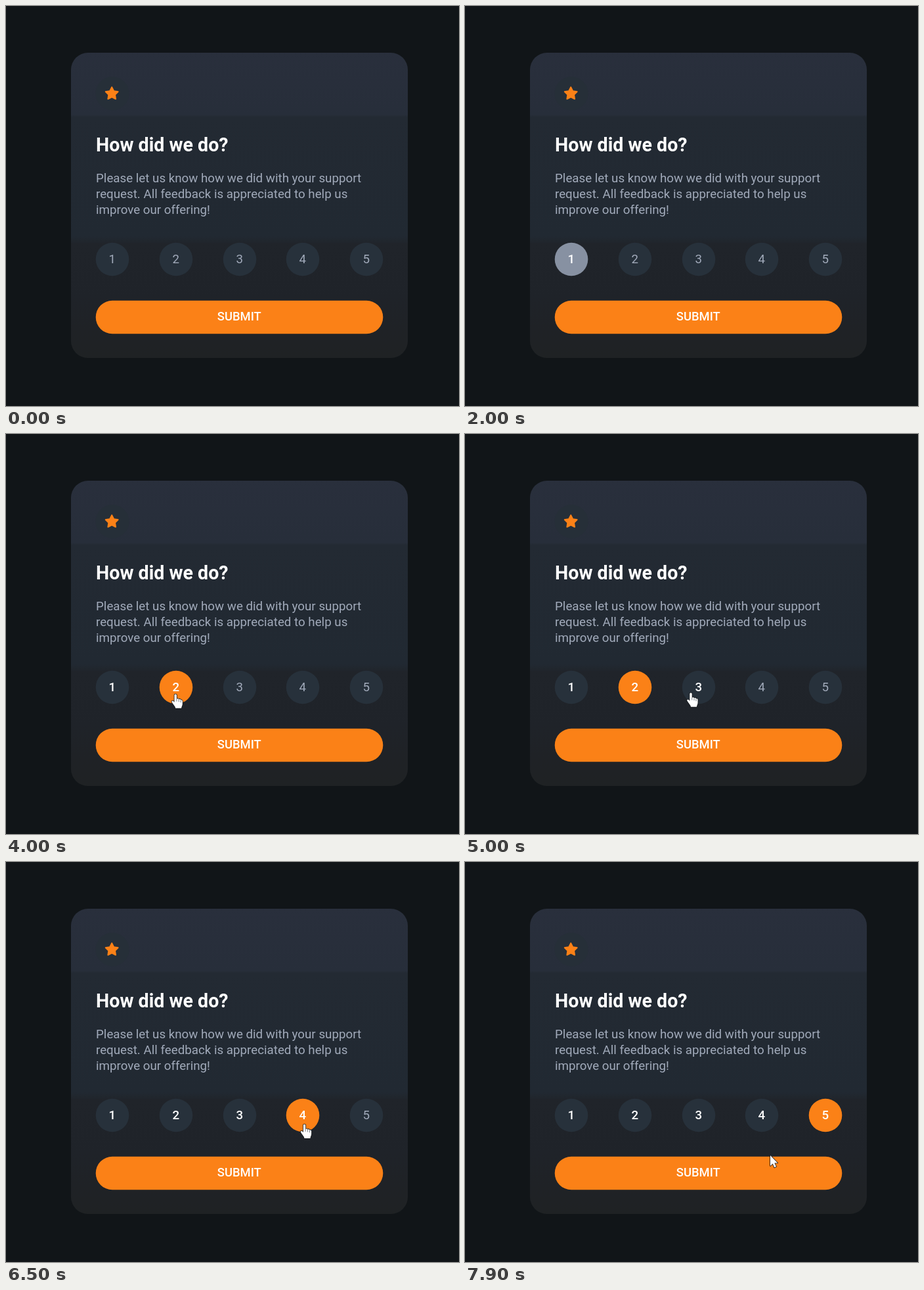
Recreate the animation shown at these times as an HTML page with a canvas. Size 690 px wide and 608 px high, loop 8 s.

```html
<!DOCTYPE html>
<html lang="en">
<head>
<meta charset="utf-8">
<title>Rating card</title>
<style>
  html, body { margin: 0; width: 100%; height: 100%; overflow: hidden; background: #111518; }
  canvas { display: block; width: 690px; height: 608px; }
</style>
</head>
<body>
<canvas id="stage" width="690" height="608"></canvas>
<script>
const ctx = document.getElementById('stage').getContext('2d');

const LOOP = 8000, STEP = 100;
const ORANGE = '#fb8117', CHIP = '#27313b', HOVER = '#8791a2';
const WHITE = '#ffffff', MUTED = '#a1aaba';
const FONT = 'Roboto, "Open Sans", sans-serif';

const CHIP_X = [162, 259, 356, 452, 549], CHIP_Y = 385, CHIP_R = 25.3;
const CLICKS = [2500, 3600, 5300, 6200, 7500];
const HOVER_START = 2000, POINTER_START = 2100;

// Pointer route: time, x, y
const ROUTE = [
  [2000, 164, 392], [2700, 170, 393], [3100, 228, 395], [3350, 252, 396],
  [4400, 262, 396], [5000, 344, 394], [5200, 352, 394], [5450, 358, 396],
  [5800, 433, 400], [6050, 448, 400], [6600, 456, 399], [7300, 534, 393],
  [7450, 544, 394], [7600, 542, 398], [7900, 465, 446]
];

const HAND = new Path2D(
  'M-1.7 1 C-1.7 -1 1.7 -1 1.7 1 V7 C2.6 5.8 4.9 6.1 5 7.7 ' +
  'C6 6.4 8 7 8 8.6 C9 7.8 10.6 8.3 10.6 10 V14.4 ' +
  'C10.6 16.8 9.2 17.6 8.9 20.8 H0 C-.4 18 -2.6 16.2 -4 14 ' +
  'L-5.6 11.5 C-6.3 9.9 -4.4 8.9 -3.2 10.1 L-1.7 11.7 Z');
const ARROW = new Path2D(
  'M0 0 V16 L3.7 12.5 L6.3 18.3 L9 17.1 L6.4 11.5 H11.2 Z');

function pointerAt(t) {
  let i = 1;
  while (i < ROUTE.length - 1 && ROUTE[i][0] < t) i++;
  const [t0, x0, y0] = ROUTE[i - 1], [t1, x1, y1] = ROUTE[i];
  const k = Math.max(0, Math.min(1, (t - t0) / (t1 - t0)));
  return { x: x0 + (x1 - x0) * k, y: y0 + (y1 - y0) * k };
}

function text(str, x, y, size, color, weight = 400, align = 'left') {
  ctx.font = `${weight} ${size}px ${FONT}`;
  ctx.textAlign = align;
  ctx.fillStyle = color;
  ctx.fillText(str, x, y);
}

function disc(x, y, r, color) {
  ctx.fillStyle = color;
  ctx.beginPath();
  ctx.arc(x, y, r, 0, Math.PI * 2);
  ctx.fill();
}

function roundRect(x, y, w, h, r, fill) {
  ctx.fillStyle = fill;
  ctx.beginPath();
  ctx.roundRect(x, y, w, h, r);
  ctx.fill();
}

function star(x, y, outer, inner) {
  ctx.beginPath();
  for (let i = 0; i < 10; i++) {
    const r = i % 2 ? inner : outer, a = (i / 5 - 0.5) * Math.PI;
    ctx.lineTo(x + r * Math.cos(a), y + r * Math.sin(a));
  }
  ctx.closePath();
  ctx.fillStyle = ctx.strokeStyle = ORANGE;
  ctx.lineWidth = 2;
  ctx.lineJoin = 'round';
  ctx.fill();
  ctx.stroke();
}

const cardFill = ctx.createLinearGradient(0, 71, 0, 535);
[[71, '#292f3c'], [165, '#272e3a'], [169, '#232a33'], [350, '#212932'],
 [362, '#20242a'], [440, '#1f2329'], [490, '#1f2226'], [535, '#1f2224']]
  .forEach(([y, c]) => cardFill.addColorStop((y - 71) / 464, c));

function drawCard() {
  ctx.fillStyle = '#111518';
  ctx.fillRect(0, 0, 690, 608);
  roundRect(99, 71, 513, 464, 26, cardFill);
  disc(162, 133, 25.5, '#262f38');
  star(161.2, 133.3, 9.9, 5.1);
  text('How did we do?', 137, 221, 28.6, WHITE, 700);
  ['Please let us know how we did with your support',
   'request. All feedback is appreciated to help us',
   'improve our offering!']
    .forEach((line, i) => text(line, 137, 268 + i * 24, 18.75, MUTED));
  roundRect(136.7, 447.7, 437.6, 50.6, 25.3, ORANGE);
  text('SUBMIT', 355.3, 478, 18.4, WHITE, 500, 'center');
}

function drawChips(selected, hovered) {
  CHIP_X.forEach((x, i) => {
    let fill = CHIP;
    if (i === selected) fill = ORANGE;
    else if (i === hovered && selected < 0) fill = HOVER;
    const bright = i <= selected || i === hovered;
    disc(x, CHIP_Y, CHIP_R, fill);
    text(i + 1, x - 0.3, 390.5, 18.7, bright ? WHITE : MUTED, bright ? 500 : 400, 'center');
  });
}

function drawPointer({ x, y }, isHand) {
  const shape = isHand ? HAND : ARROW;
  ctx.save();
  ctx.translate(x, y);
  ctx.lineJoin = 'round';
  ctx.lineWidth = 1.6;
  ctx.strokeStyle = '#15191d';
  ctx.stroke(shape);
  ctx.fillStyle = WHITE;
  ctx.fill(shape);
  if (isHand) {
    ctx.lineWidth = 0.8;
    ctx.strokeStyle = '#59616b';
    ctx.beginPath();
    [[1.7, 7], [5, 7.7], [8, 8.6]].forEach(([lx, ly]) => {
      ctx.moveTo(lx, ly);
      ctx.lineTo(lx, ly + 3.5);
    });
    ctx.stroke();
  }
  ctx.restore();
}

function render(t) {
  const pointer = pointerAt(t);
  const selected = CLICKS.filter(c => c <= t).length - 1;
  const hovered = t < HOVER_START ? -1 : CHIP_X.findIndex(
    x => Math.hypot(pointer.x - x, pointer.y - CHIP_Y) <= CHIP_R);
  drawCard();
  drawChips(selected, hovered);
  if (t >= POINTER_START) drawPointer(pointer, hovered >= 0);
}

const start = performance.now();
function tick() {
  const t = (performance.now() - start) % LOOP;
  render(Math.floor(t / STEP) * STEP);
  requestAnimationFrame(tick);
}
tick();
</script>
</body>
</html>
```
